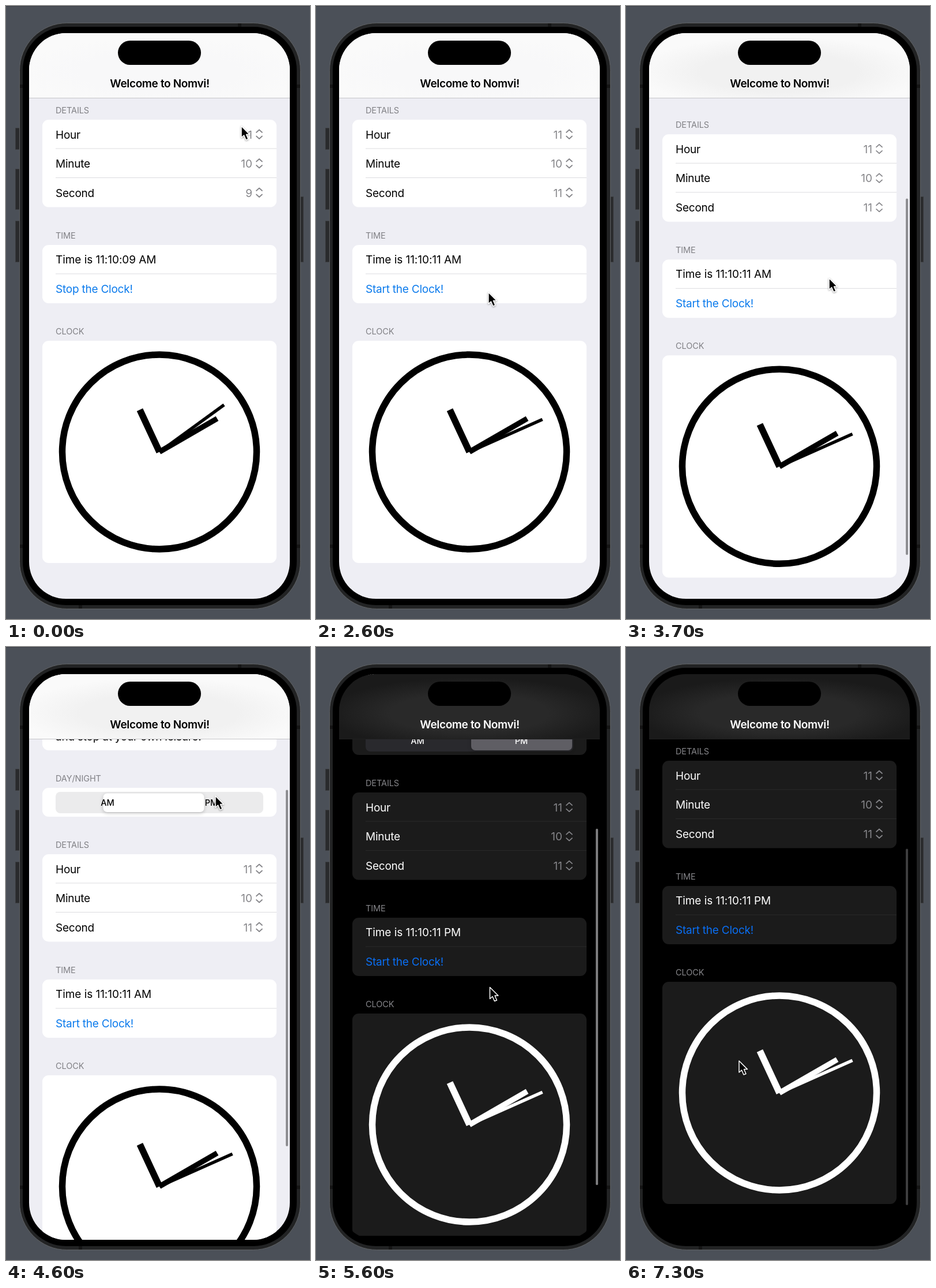
An HTML page that plays this animation: 527x1062 px, repeating every 7400 ms.

```html
<!DOCTYPE html>
<html lang="en">
<head>
<meta charset="utf-8">
<title>Clock demo</title>
<style>
  html, body { margin: 0; width: 100%; height: 100%; overflow: hidden; background: #4b5058; }
  svg {
    display: block; width: 527px; height: 1062px;
    font: 19px Inter, "Liberation Sans", sans-serif; letter-spacing: -.23px;
    --bg: #eeeef4; --card: #fff; --ink: #000; --line: #dcdcdf; --head: #808085; --value: #858589;
    --link: #0a7aec; --track: #ebebec; --thumb: #fff; --bar: #8e8e92;
    --navMid: #f8f8f9; --navRim: #fafafa; --edge: #c6c6c9;
  }
  svg.scrolled { --navMid: #f1f1f1; }
  svg.dark {
    --bg: #000; --card: #1b1b1b; --ink: #fff; --line: #2a2a2b; --head: #86868a;
    --link: #0a6ff4; --track: #29292d; --thumb: #5f5e64; --bar: #7c7c7e;
    --navMid: #292929; --navRim: #1a1a1a; --edge: #202020;
  }
  text { fill: var(--ink); white-space: pre; }
  .head { font-size: 14.5px; letter-spacing: -.1px; fill: var(--head); }
  .value { fill: var(--value); text-anchor: end; letter-spacing: 0; }
  .seg { font-size: 14.5px; font-weight: 500; text-anchor: middle; letter-spacing: 0; }
  .card { fill: var(--card); }
  .line { stroke: var(--line); }
  .chevron { fill: none; stroke: var(--value); stroke-width: 1.7; stroke-linecap: round; stroke-linejoin: round; }
  .clock { fill: none; stroke: var(--ink); }
  #time { letter-spacing: -.05px; }
  #link { fill: var(--link); }
  #title { font-weight: 600; text-anchor: middle; letter-spacing: -.35px; }
  #thumb { fill: var(--thumb); filter: drop-shadow(0 2px 3px #0003); }
  #cursor { filter: drop-shadow(0 1.5px 1.5px #0006); }
</style>
</head>
<body>
<svg id="stage" viewBox="0 0 527 1062">
  <defs>
    <clipPath id="screen"><rect x="40" y="47" width="452" height="980" rx="64"/></clipPath>
    <radialGradient id="nav" cy=".6" r=".55">
      <stop offset=".55" style="stop-color:var(--navMid)"/>
      <stop offset="1" style="stop-color:var(--navRim)"/>
    </radialGradient>
  </defs>

  <path d="M0 .5H527" stroke="#3b3f46"/>
  <path d="M16.500 211.500h7v37h-7zM16.500 282.500h7v70h-7zM16.500 372.500h7v71h-7zM510.500 330.500h5v113h-5z"
        fill="#292a2c" stroke="#3b3c3f"/>
  <rect x="23.500" y="29.500" width="487" height="1015" rx="82" fill="#222324" stroke="#606264"/>
  <path d="M402 33h6M126 1041h6M24 139h6M24 936h6M504 139h6M504 936h6" stroke="#151515" stroke-width="6"/>
  <rect x="29" y="36" width="475" height="1002" rx="75"/>

  <g clip-path="url(#screen)">
    <rect x="40" y="47" width="452" height="980" fill="var(--bg)"/>
    <g id="page">
      <rect class="card" x="63" y="-120" width="406" height="137" rx="11"/>
      <text x="86" y="0">and stop at your own leisure.</text>
      <text class="head" x="86" y="71">DAY/NIGHT</text>
      <rect class="card" x="63" y="82" width="406" height="50" rx="11"/>
      <rect x="86" y="89" width="360" height="37" rx="8" fill="var(--track)"/>
      <rect id="thumb" y="91.500" width="175" height="32.500" rx="7"/>
      <text class="seg" x="176" y="113">AM</text>
      <text class="seg" x="356" y="113">PM</text>

      <text class="head" x="86" y="186">DETAILS</text>
      <rect class="card" x="63" y="197" width="406" height="151.500" rx="11"/>
      <g id="rows"></g>

      <text class="head" x="86" y="403">TIME</text>
      <rect class="card" x="63" y="414" width="406" height="101" rx="11"/>
      <path class="line" d="M86 464H469"/>
      <text id="time" x="86" y="446"></text>
      <text id="link" x="86" y="497"></text>

      <text class="head" x="86" y="569">CLOCK</text>
      <rect class="card" x="63" y="580" width="406" height="385" rx="11"/>
      <g class="clock" transform="translate(266 772.500)">
        <circle r="168.500" stroke-width="11.500"/>
        <path d="M0 0V-80.500" stroke-width="11.500" transform="rotate(-25)"/>
        <path d="M0 0V-115.500" stroke-width="9.500" transform="rotate(60)"/>
        <path id="secondHand" d="M0 0V-138.500" stroke-width="5.500"/>
      </g>
    </g>
    <rect id="bar" x="485" width="4" rx="2" fill="var(--bar)"/>
    <rect x="40" y="47" width="452" height="112.500" fill="url(#nav)"/>
    <path d="M40 159.500H492" stroke="var(--edge)"/>
    <text id="title" x="266.500" y="140.500">Welcome to Nomvi!</text>
    <rect x="194" y="60" width="144" height="42" rx="21"/>
  </g>

  <path id="cursor" d="M0 0V20L4.500 16L8 24L12 22.500L8.600 14.600H14.500Z"
        stroke="#fff" stroke-width="1.500" stroke-linejoin="round"/>
</svg>
<script>
const LOOP = 7400, STEP = 100, SCROLL = 162;
const el = id => document.getElementById(id);

const linear = u => u;
const smooth = u => u * u * (3 - 2 * u);
// Ends with a slight overshoot, like a flicked list
const bounce = u => 1 + 1.78 * (u - 1) ** 3 + .78 * (u - 1) ** 2;

// Progress from 0 to 1 between two times
const ramp = (t, from, to, ease = linear) => ease(Math.min(1, Math.max(0, (t - from) / (to - from))));

// Where the pointer rests or turns: time, x, y
const stops = [
  [0, 408, 208], [850, 168, 573], [1500, 180, 482], [2200, 180, 482], [2900, 376, 505], [3500, 350, 403],
  [3900, 354, 540], [4400, 363, 258], [4600, 363, 258], [5400, 303, 640], [6000, 297, 445], [6600, 196, 717]
];

function pointer(t) {
  let [start, x, y] = stops[0];
  for (const [end, nextX, nextY] of stops.slice(1)) {
    const u = ramp(t, start, end, smooth);
    x += (nextX - x) * u;
    y += (nextY - y) * u;
    if (t < end) break;
    start = end;
  }
  return [x, y];
}

el("rows").innerHTML = ["Hour", "Minute", "Second"].map((name, i) => `
  <g transform="translate(0 ${i * 50.5})">
    ${i ? '<path class="line" d="M86 196.500H469"/>' : ""}
    <text x="86" y="229.500">${name}</text>
    <text class="value" id="${name}" x="427" y="229.500"></text>
    <path class="chevron" d="M434 219l5-4.500l5 4.500M434 225.500l5 4.500l5-4.500"/>
  </g>`).join("");
el("Hour").textContent = 11;
el("Minute").textContent = 10;

function draw(t) {
  const second = Math.min(11, 9 + Math.floor((t + 100) / 1000));
  const dark = t >= 4700;
  const scroll = SCROLL * (ramp(t, 3500, 4300, smooth) - ramp(t, 5400, 6250, bounce));

  el("stage").classList.toggle("dark", dark);
  el("stage").classList.toggle("scrolled", scroll > 20);
  el("Second").textContent = second;
  el("time").textContent = `Time is 11:10:${String(second).padStart(2, "0")} ${dark ? "PM" : "AM"}`;
  el("link").textContent = `${t < 2200 ? "Stop" : "Start"} the Clock!`;
  el("secondHand").setAttribute("transform", `rotate(${second * 6})`);
  el("page").setAttribute("transform", `translate(0 ${scroll})`);
  el("thumb").setAttribute("x", 87 + 182 * ramp(t, 4500, 4715, smooth));
  el("cursor").setAttribute("transform", `translate(${pointer(t)})`);

  // The bar shrinks against its end while the page overshoots
  const top = 349.5 - scroll * (scroll > 0 ? .63 : 1);
  const shown = ramp(t, 3500, 3600) - ramp(t, 4700, 5000) + ramp(t, 5400, 5500) - .5 * ramp(t, 7200, 7300);
  el("bar").setAttribute("y", top);
  el("bar").setAttribute("height", Math.min(617.5, 967 - top));
  el("bar").setAttribute("opacity", shown);
}

const start = performance.now();
function frame() {
  const t = (performance.now() - start) % LOOP;
  draw(Math.floor(t / STEP) * STEP);
  requestAnimationFrame(frame);
}
frame();
</script>
</body>
</html>
```
